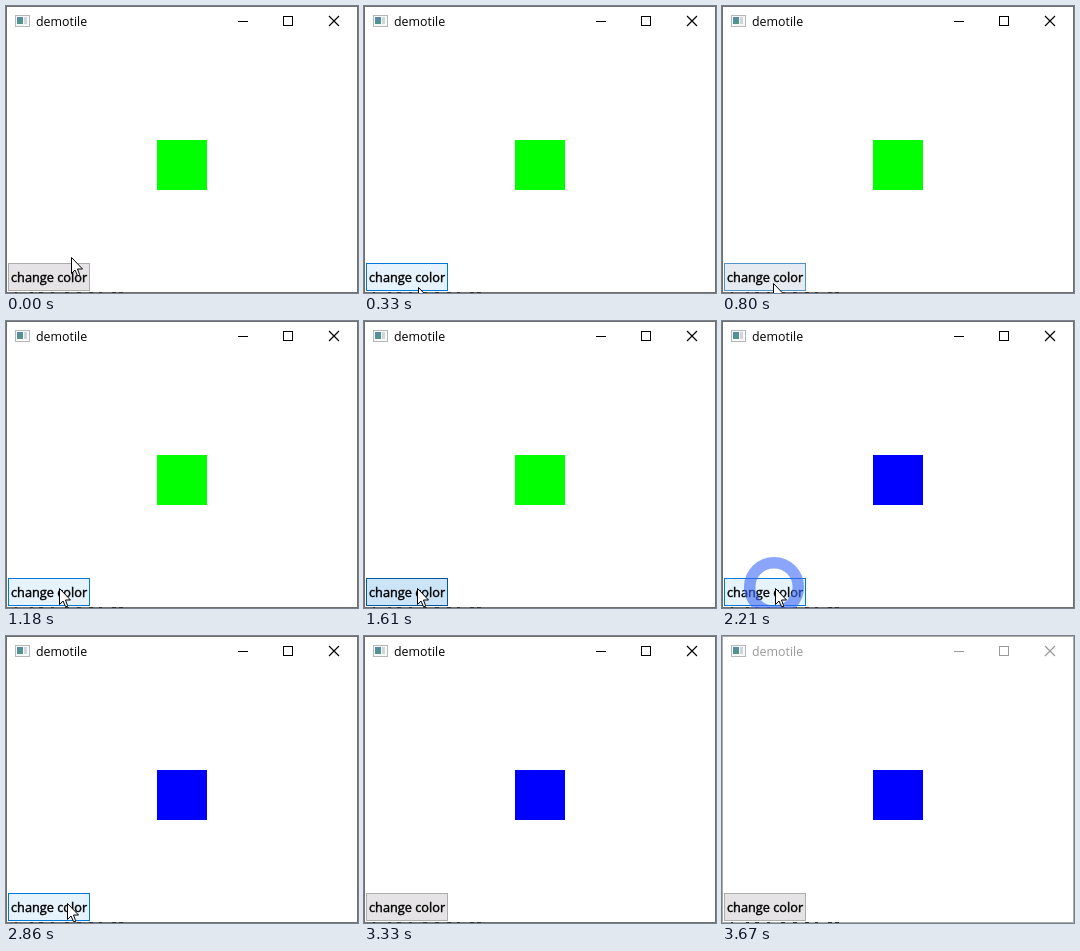
Animation of 352 by 287 pixels, one loop 3780 ms. Source, as an HTML page with a canvas:

```html
<!DOCTYPE html>
<html lang="en">
<head>
<meta charset="utf-8">
<title>demotile</title>
<style>
  html, body { margin: 0; width: 100%; height: 100%; overflow: hidden; background: #fff; }
  canvas { display: block; }
</style>
</head>
<body>
<canvas id="stage" width="352" height="287"></canvas>
<script>
const ctx = document.getElementById('stage').getContext('2d');
const LOOP = 3780, PRESS = 1610, RELEASE = 2100, RING_END = 2300, INACTIVE = 3670;

const REST = { fill: [229, 227, 229], border: [173, 173, 173] };
const HOVER = { fill: [230, 242, 252], border: [0, 120, 215] };
const PRESSED = { fill: [204, 228, 247], border: [0, 84, 153] };

// Smooth step from 0 to 1 between two times
function ramp(t, from, to) {
  const k = Math.min(1, Math.max(0, (t - from) / (to - from)));
  return k * k * (3 - 2 * k);
}

const mix = (a, b, k) => `rgb(${a.map((v, i) => Math.round(v + (b[i] - v) * k))})`;

function rect(x, y, w, h, color) {
  ctx.fillStyle = color;
  ctx.fillRect(x, y, w, h);
}

function frame(x, y, w, h, color) {
  ctx.strokeStyle = color;
  ctx.lineWidth = 1;
  ctx.strokeRect(x + 0.5, y + 0.5, w - 1, h - 1);
}

function text(label, x, y, size, color, boldness = 0) {
  ctx.font = `${size}px "Open Sans", "Noto Sans", sans-serif`;
  ctx.fillStyle = ctx.strokeStyle = color;
  ctx.fillText(label, x, y);
  if (!boldness) return;
  ctx.lineWidth = boldness;
  ctx.strokeText(label, x, y);
}

function drawIcon() {
  rect(9, 9, 15, 12, '#f7f8f8');
  frame(9, 9, 15, 12, '#b4b8ba');
  const blend = ctx.createLinearGradient(11, 11, 16, 18);
  blend.addColorStop(0, '#5a86b4');
  blend.addColorStop(1, '#4f9880');
  rect(11, 11, 6, 7, blend);
  rect(18, 11, 3, 7, '#cfd6d9');
}

// Slivers of the content behind the lower edge
function drawSlivers() {
  let seed = 7;
  const random = () => (seed = seed * 16807 % 2147483647) / 2147483647;
  for (let x = 9; x < 118; x += 7 + 9 * random())
    rect(Math.round(x), 286, 2 + Math.round(3 * random()), 1, '#333');
}

function drawWindow(active) {
  const ink = active ? '#000' : '#999';
  rect(0, 0, 352, 287, '#fff');
  frame(0, 0, 352, 287, active ? '#707070' : '#aaa');
  drawSlivers();
  drawIcon();
  text('demotile', 30, 20, 12.4, ink);
  rect(232, 15, 10, 1, ink);
  frame(277, 10, 10, 10, ink);
  ctx.lineWidth = 1.2;
  ctx.beginPath();
  for (const side of [-5, 5]) {
    ctx.moveTo(328 - side, 10);
    ctx.lineTo(328 + side, 20);
  }
  ctx.stroke();
}

function drawButton(t) {
  const hover = ramp(t, 110, 270) - ramp(t, 440, 600) + ramp(t, 760, 840) - ramp(t, 2960, 3200);
  const pressed = t >= PRESS && t < RELEASE;
  const look = pressed ? PRESSED : HOVER;
  const amount = pressed ? 1 : hover;
  rect(2, 257, 82, 28, mix(REST.fill, look.fill, amount));
  frame(2, 257, 82, 28, mix(REST.border, look.border, amount));
  text('change color', 5, 276, 12.75, '#000', 0.4);
}

function drawRing(t) {
  if (t < RELEASE || t >= RING_END) return;
  const k = (t - RELEASE) / (RING_END - RELEASE);
  ctx.beginPath();
  ctx.arc(52, 266, 11 + 24 * k, 0, Math.PI * 2);
  ctx.lineWidth = 11.5;
  ctx.strokeStyle = `rgba(60,105,245,${0.8 - 0.36 * k})`;
  ctx.stroke();
}

function drawPointer(t) {
  const dip = ramp(t, 20, 450), back = ramp(t, 740, 840), settle = ramp(t, 980, 1210);
  const nudge = ramp(t, 2820, 2860), leave = ramp(t, 2860, 3330);
  const x = 65 - 14 * dip + 2 * settle + 8 * nudge + 224 * leave;
  const y = 251 + 37 * dip - 16 * back - 5 * settle + 21 * leave;
  ctx.save();
  ctx.translate(Math.round(x) + 0.5, Math.round(y) + 0.5);
  const arrow = new Path2D('M0 0V16L3.5 12.5L6 18H8V17L6 11.5H11Z');
  ctx.fillStyle = '#fff';
  ctx.fill(arrow);
  ctx.strokeStyle = '#000';
  ctx.lineWidth = 1;
  ctx.stroke(arrow);
  ctx.restore();
}

function draw(now) {
  const t = now % LOOP;
  drawWindow(t < INACTIVE);
  rect(151, 134, 50, 50, t < RELEASE ? '#0f0' : '#00f');
  drawButton(t);
  drawRing(t);
  drawPointer(t);
}

const start = performance.now();
function tick() {
  draw(performance.now() - start);
  requestAnimationFrame(tick);
}
tick();
</script>
</body>
</html>
```
